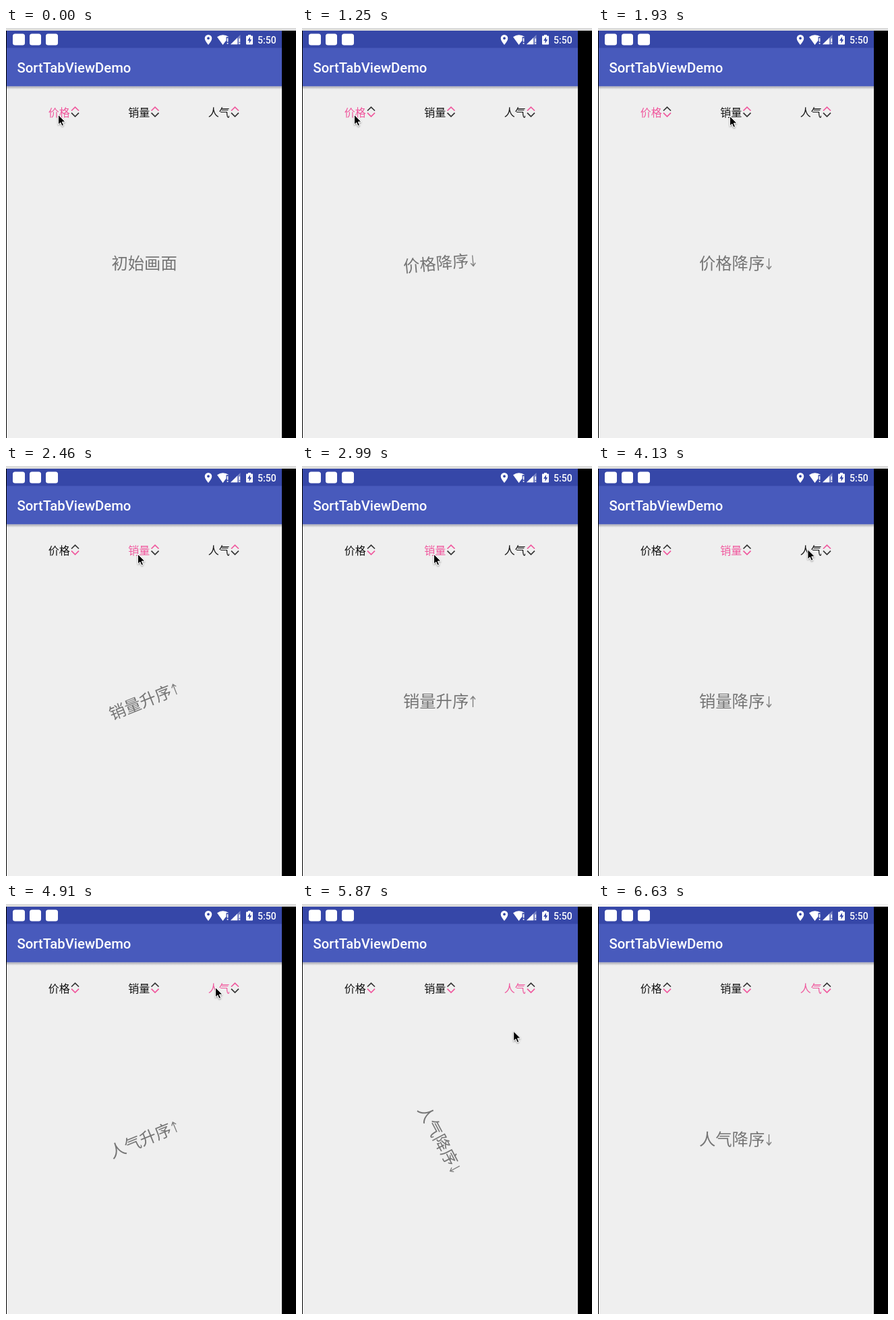
An HTML page that plays this animation: 430x607 px, repeating every 6730 ms.

```html
<!DOCTYPE html>
<html lang="zh-CN">
<head>
<meta charset="utf-8">
<title>SortTabViewDemo</title>
<style>
  html, body { margin: 0; width: 100%; height: 100%; overflow: hidden; background: #000; }
  svg { display: block; width: 430px; height: 607px; }
  text { font-family: "Noto Sans CJK SC", "Noto Sans CJK", sans-serif; }
  .ui { font-family: Roboto, sans-serif; font-weight: 500; fill: #fff; }
  .tab text { font-size: 16px; fill: #111; }
  .tab path { fill: none; stroke: #333; stroke-width: 1.7; }
  .tab.on text { fill: #f0579d; }
  .tab.asc .up, .tab.desc .down { stroke: #f0579d; }
  #label { font-size: 24.3px; fill: #757575; }
  #arrow { fill: none; stroke: #7c7c7c; stroke-width: 1.3; }
</style>
</head>
<body>
<svg viewBox="0 0 430 607">
  <defs>
    <linearGradient id="shade" x2="0" y2="1">
      <stop stop-color="#aaaab2"/>
      <stop offset="1" stop-color="#efefef"/>
    </linearGradient>
    <filter id="soft" x="-50%" y="-50%" width="200%" height="200%">
      <feDropShadow dx="0" dy="1.2" stdDeviation="1" flood-opacity=".4"/>
    </filter>
  </defs>

  <rect id="strip" width="430" height="4"/>
  <rect x="1" y="4" width="408" height="603" fill="#efefef"/>
  <rect x="1" y="4" width="408" height="26" fill="#3647a8"/>
  <rect x="1" y="29.5" width="408" height="57" fill="#485abc"/>
  <rect x="1" y="86.5" width="408" height="4.5" fill="url(#shade)"/>

  <g fill="#fff">
    <rect x="10" y="8.5" width="18" height="17" rx="3.5"/>
    <rect x="35" y="8.5" width="17" height="17" rx="3.5"/>
    <rect x="59" y="8.5" width="18" height="17" rx="3.5"/>
    <path fill-rule="evenodd" d="M300 25C297 21 294.7 18 294.7 15.2a5.3 5.3 0 0 1 10.6 0C305.3 18 303 21 300 25ZM300 13.3a1.9 1.9 0 1 0 .01 0Z"/>
    <path d="M313 13.3Q321.5 7 330.5 13.3H326.5V18.5L321.5 25Z"/>
    <path d="M327.7 15h1.7v5.5h-1.7zM327.7 22h1.7v1.8h-1.7z"/>
    <path opacity=".35" d="M333 24.3L347.5 10V24.3Z"/>
    <path d="M333 24.3L343 14.5V24.3ZM345.5 15.5h1.6v5.3h-1.6zM345.5 22.3h1.6v1.8h-1.6z"/>
    <path d="M357 11.5h2V10h4v1.5h2a1 1 0 0 1 1 1V23.500a1 1 0 0 1-1 1h-8a1 1 0 0 1-1-1V12.500a1 1 0 0 1 1-1Z"/>
    <path fill="#3647a8" d="M362 13L358 18.800H360.500V23L364.200 17H362Z"/>
  </g>
  <text class="ui" x="373" y="22.500" font-size="14">5:50</text>
  <text class="ui" x="16.500" y="66" font-size="20.300">SortTabViewDemo</text>

  <g id="tabs"></g>

  <g id="spin">
    <text id="label" y="9"></text>
    <path id="arrow"/>
  </g>

  <path id="cursor" filter="url(#soft)" stroke="#fff" stroke-width="1"
        d="M0 0V14.500L3.300 11.500L5.500 16.600L8 15.500L5.800 10.500H10.500Z"/>
</svg>

<script>
const LOOP = 6730, STEP = 87.3, START = 810;
const $ = id => document.getElementById(id);

// Each click selects a tab, sets its order and swings the label.
const clicks = [
  { at: 795, tab: 0, order: "desc" },
  { at: 2100, tab: 1, order: "asc" },
  { at: 3300, tab: 1, order: "desc" },
  { at: 4570, tab: 2, order: "asc" },
  { at: 5710, tab: 2, order: "desc" }
];
const names = ["价格", "销量", "人气"];
const orderText = { asc: "升序", desc: "降序" };
const arrows = {
  asc: "M49 9V-7M45.500 -2.500L49 -7L52.500 -2.500",
  desc: "M49 -7V9M45.500 4.500L49 9L52.500 4.500"
};

const swing = [[0, 0], [160, 62], [350, -22.5], [540, 8.5], [700, -2.5], [790, 0]];
const pointer = [
  [1260, 77, 128], [1334, 98, 133], [1421, 131, 133], [1600, 180, 133], [1850, 195, 130],
  [3690, 195, 130], [3860, 255, 128], [4130, 311, 123], [4390, 310, 123],
  [5760, 310, 123], [5873, 313, 186], [5960, 356, 592], [6047, 370, 640]
];

const linear = p => p;
const sine = p => (1 - Math.cos(Math.PI * p)) / 2;

// Interpolates rows of [time, ...values].
function track(keys, t, ease) {
  const i = keys.findIndex(k => k[0] > t);
  if (i < 0) return keys[keys.length - 1].slice(1);
  if (i === 0) return keys[0].slice(1);
  const a = keys[i - 1], b = keys[i];
  const p = ease((t - a[0]) / (b[0] - a[0]));
  return a.slice(1).map((v, j) => v + (b[j + 1] - v) * p);
}

$("tabs").innerHTML = names.map((name, i) => `
  <g class="tab" transform="translate(${62.7 + i * 118.5} 0)">
    <text y="131">${name}</text>
    <path class="up" d="M34.300 122.500L39.800 117.200L45.300 122.500"/>
    <path class="down" d="M34.300 125.700L39.800 131L45.300 125.700"/>
  </g>`).join("");
const tabs = [...$("tabs").children];

function draw(time) {
  const t = START + Math.floor((time - START + 10) / STEP) * STEP;
  const past = clicks.filter(c => c.at <= t);
  const last = past[past.length - 1];
  const orders = ["asc", "asc", "asc"];
  past.forEach(c => orders[c.tab] = c.order);

  const active = last ? last.tab : 0;
  tabs.forEach((tab, i) =>
    tab.setAttribute("class", `tab ${orders[i]}${i === active ? " on" : ""}`));

  $("label").textContent = last ? names[active] + orderText[last.order] : "初始画面";
  $("label").setAttribute("x", last ? -54.5 : -48);
  $("arrow").setAttribute("d", last ? arrows[last.order] : "");
  const angle = last ? track(swing, t - last.at, sine)[0] : 0;
  $("spin").setAttribute("transform", `translate(204.500 348) rotate(${angle})`);

  const [x, y] = track(pointer, t, linear);
  $("cursor").setAttribute("transform", `translate(${x + 0.5} ${y + 0.5})`);
  $("strip").setAttribute("fill", time >= 6630 ? "#f3f3f3" : "#dcdcdc");
}

const origin = performance.now();
function tick() {
  draw((performance.now() - origin) % LOOP);
  requestAnimationFrame(tick);
}
tick();
</script>
</body>
</html>
```
